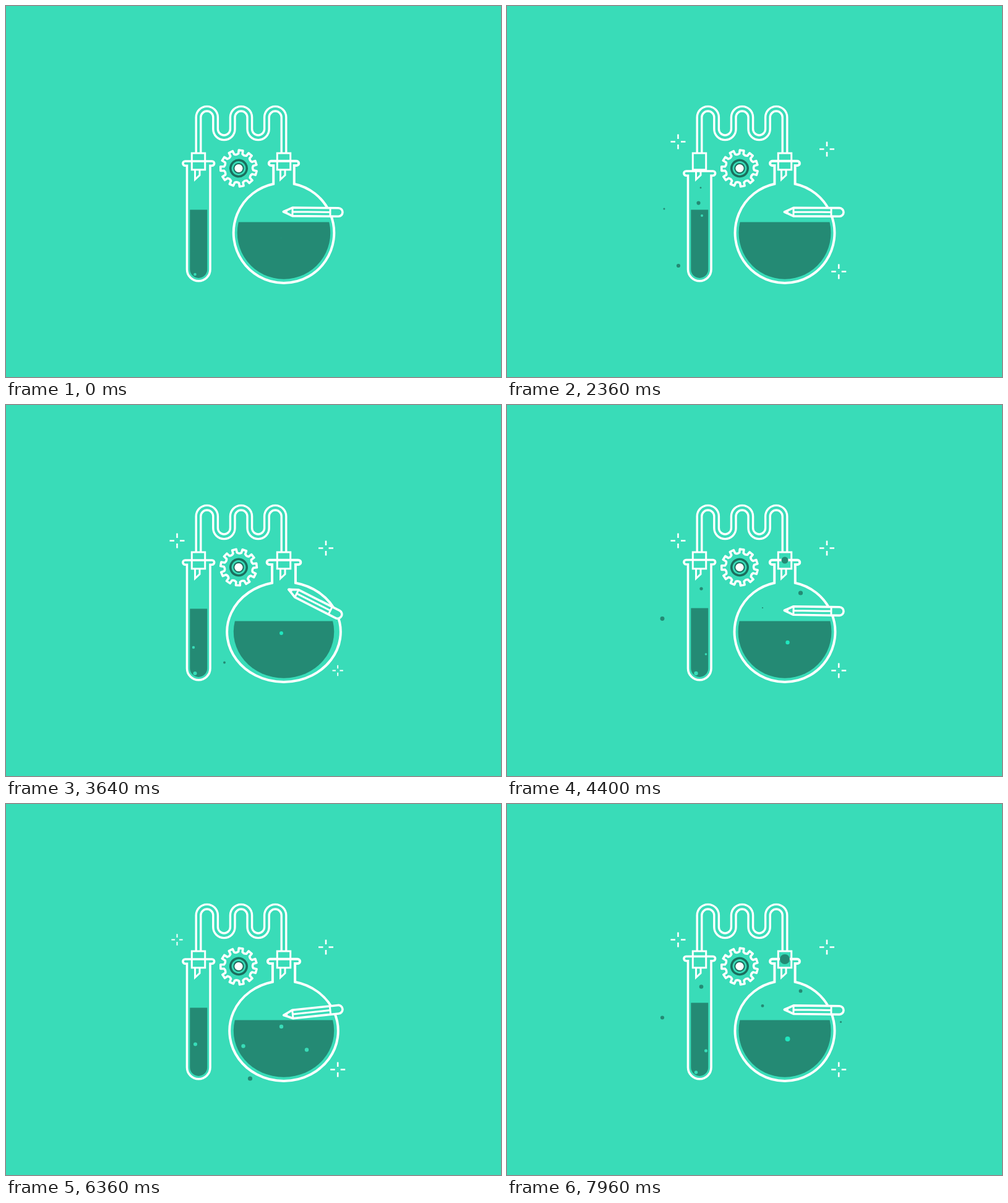
Animation of 800x600 px, one loop 8000 ms. Source, as an HTML page:

```html
<!DOCTYPE html>
<html lang="en">
<head>
<meta charset="utf-8">
<title>Laboratory</title>
<style>
  html, body { margin: 0; width: 100%; height: 100%; overflow: hidden; background: #39dcb8; }
  svg { display: block; width: 100vw; height: 100vh; }
  .line { fill: none; stroke: #fff; stroke-width: 3.6; }
  .thin { stroke-width: 3; }
  .liquid { fill: #248a74; }
  .paper { fill: #39dcb8; }
  .flask { stroke-width: 4; vector-effect: non-scaling-stroke; }
</style>
</head>
<body>
<svg viewBox="0 0 800 600">
  <defs>
    <g id="cap" class="line thin">
      <rect x="-10.7" y="238" width="21.4" height="26.8"/>
      <path d="M-5.5 265V280.5L2 273.5V265"/>
    </g>
    <path id="coil" fill="none" d="M311 238V180a13.8 13.8 0 0 1 27.6 0V199a13.8 13.8 0 0 0 27.6 0V180a13.8 13.8 0 0 1 27.6 0V199a13.8 13.8 0 0 0 27.6 0V180a13.8 13.8 0 0 1 27.6 0V238"/>
  </defs>

  <use href="#coil" stroke="#fff" stroke-width="11"/>
  <use href="#coil" stroke="#39dcb8" stroke-width="4.2"/>

  <g id="gear">
    <path id="teeth" class="line" stroke-linejoin="round"/>
    <circle r="13.2" fill="none" stroke="#1b6f5e" stroke-width="3.6"/>
    <circle r="7.6" fill="#fff" stroke="#1b6f5e" stroke-width="2"/>
  </g>

  <path id="tubeLiquid" class="liquid"/>
  <path id="tube" class="line"/>
  <path id="flaskLiquid" class="liquid" d="M-73 -17.5H73A75 75 0 1 1 -73 -17.5Z"/>
  <path id="flask" class="line flask" d="M-16.7 -79.3V-109H-20.5a3.6 3.6 0 0 1 0 -7.2H20.5a3.6 3.6 0 0 1 0 7.2H16.7V-79.3A81 81 0 1 1 -16.7 -79.3Z"/>

  <use href="#cap" x="311"/>
  <use href="#cap" x="449"/>
  <g id="bubbles"></g>

  <g id="pencil" class="line" stroke-linejoin="round">
    <path class="paper" d="M-77.5 0L-63 -6.8H11.2a6.8 6.8 0 0 1 0 13.6H-63Z"/>
    <path class="thin" d="M-63 -6.8V6.8M-63 0H-2M-2 -6.8V6.8"/>
    <path d="M-77.5 0L-73 -1.8V1.8Z" fill="#fff"/>
  </g>
  <g id="sparkles"></g>
</svg>

<script>
const LOOP = 8000, CYCLE = 3400;
const DARK = '#248a74', LIGHT = '#39dcb8';
const $ = id => document.getElementById(id);
const clamp = v => Math.max(0, Math.min(1, v));
const smooth = v => v * v * (3 - 2 * v);

function add(parent, tag, attrs) {
  const node = document.createElementNS('http://www.w3.org/2000/svg', tag);
  for (const key in attrs) node.setAttribute(key, attrs[key]);
  return parent.appendChild(node);
}

// Damped swing that starts at a given time
function spring(t, start, amount, period, decay) {
  const age = Math.max(0, t - start);
  return amount * Math.sin(2 * Math.PI * age / period) * Math.exp(-age / decay);
}

// Three knocks per cycle, each with its own strength
const KNOCKS = [0, 1800, 2800];
const shake = (t, strengths, period, decay) =>
  strengths.reduce((sum, s, i) => sum + spring(t, KNOCKS[i], s, period, decay), 0);

// Soft hump of height 1 around a peak
const hump = (t, peak, reach) => Math.cos(Math.PI / 2 * clamp(Math.abs(t - peak) / reach)) ** 2;

// Bubbles that swell one after another, drifting up by rise px per ms
const bubbles = [];
function series(points, { first, step, color = DARK, size = 3.6, life = 880, rise = 0 }) {
  points.forEach(([x, y], i) => bubbles.push({
    y, size, life, rise, peak: first + i * step,
    node: add($('bubbles'), 'circle', { cx: x, fill: color })
  }));
}
series([[353, 416.5], [251, 345.5], [539.5, 352.5], [254, 328], [277, 420], [394.5, 444]], { first: 560, step: 480 });
series([[474.5, 304], [413, 324], [423.5, 332.5]], { first: 1000, step: 400, rise: .01 });
series([[314, 295.5], [308, 327.5], [313, 297.5], [309.5, 318]], { first: 1160, step: 420, size: 3.3, rise: .01 });
series([[303, 387], [321.5, 396], [315, 345], [306, 388.5]], { first: 440, step: 840, size: 3, color: LIGHT, rise: .025 });
series([[445, 364], [453.5, 380]], { first: 440, step: 720, size: 4, color: '#20e6be', rise: .025 });
series([[445, 360], [383.5, 391.5], [486, 397.5]], { first: 2960, step: 0, size: 3.2, color: LIGHT, rise: .025 });
series([[305.5, 434]], { first: 650, step: 0, size: 4, life: 1900, color: LIGHT });
series([[449, 251]], { first: 1160, step: 0, size: 8, life: 600 });

const sparkles = [[276.5, 219.5], [517, 231.5], [536.2, 429.5]].map(([x, y]) => ({ x, y,
  node: add($('sparkles'), 'path', { class: 'line', d: 'M0 -12V-4.5M0 12V4.5M-12 0H-4.5M12 0H4.5', style: 'stroke-width:2.6' }) }));

const TEETH = 11, PITCH = 360 / TEETH;
const polar = (r, deg) => {
  const a = deg * Math.PI / 180;
  return (r * Math.cos(a)).toFixed(2) + ' ' + (r * Math.sin(a)).toFixed(2);
};
let outline = '';
for (let i = 0; i < TEETH; i++) {
  const a = i * PITCH;
  outline += `${i ? 'L' : 'M'}${polar(23.8, a - 8)}L${polar(29.4, a - 6.5)}L${polar(29.4, a + 6.5)}` +
    `L${polar(23.8, a + 8)}A7 7 0 0 0 ${polar(23.8, a + PITCH - 8)}`;
}
$('teeth').setAttribute('d', outline + 'Z');

function draw(now) {
  const t = now % LOOP % CYCLE;
  const set = (id, key, value) => $(id).setAttribute(key, value);
  const stretch = 1 + shake(t, [.36, .05, .146], 700, 300);
  const tilt = shake(t, [71, -2.6, -12.7], 900, 250);
  const lift = hump(t, 1160, 200);
  const lip = 254.6 - 4.5 * lift + 16 * hump(t, 2360, 170);
  const level = 329.4 - 8 * lift;

  set('flask', 'transform', `translate(449 367) scale(${stretch} 1)`);
  set('flaskLiquid', 'transform', `translate(449 367) scale(${Math.min(stretch, 1.083)} 1)`);
  set('pencil', 'transform', `translate(526 333.4) rotate(${tilt})`);
  set('gear', 'transform', `translate(376 262.5) rotate(${2 * PITCH * smooth(clamp(t / 900)) - 83})`);
  set('tube', 'd', `M292.5 ${lip + 3.6}H289.5a3.6 3.6 0 0 1 0 -7.2H333a3.6 3.6 0 0 1 0 7.2H330V426a18.75 18.75 0 0 1 -37.5 0Z`);
  set('tubeLiquid', 'd', `M297.3 ${level}H325.2V426a13.95 13.95 0 0 1 -27.9 0Z`);

  for (const b of bubbles) {
    const age = t - b.peak;
    b.node.setAttribute('r', b.size * Math.sqrt(clamp(1 - 2 * Math.abs(age) / b.life)));
    b.node.setAttribute('cy', b.y - age * b.rise);
  }
  sparkles.forEach((s, i) => {
    const size = clamp((t - 20 - 60 * i) / 140) * (1 - clamp((t - 2930 - 120 * i) / 130));
    s.node.setAttribute('transform', `translate(${s.x} ${s.y}) scale(${size})`);
  });
}

const start = performance.now();
function frame() {
  draw(performance.now() - start);
  requestAnimationFrame(frame);
}
frame();
</script>
</body>
</html>
```
